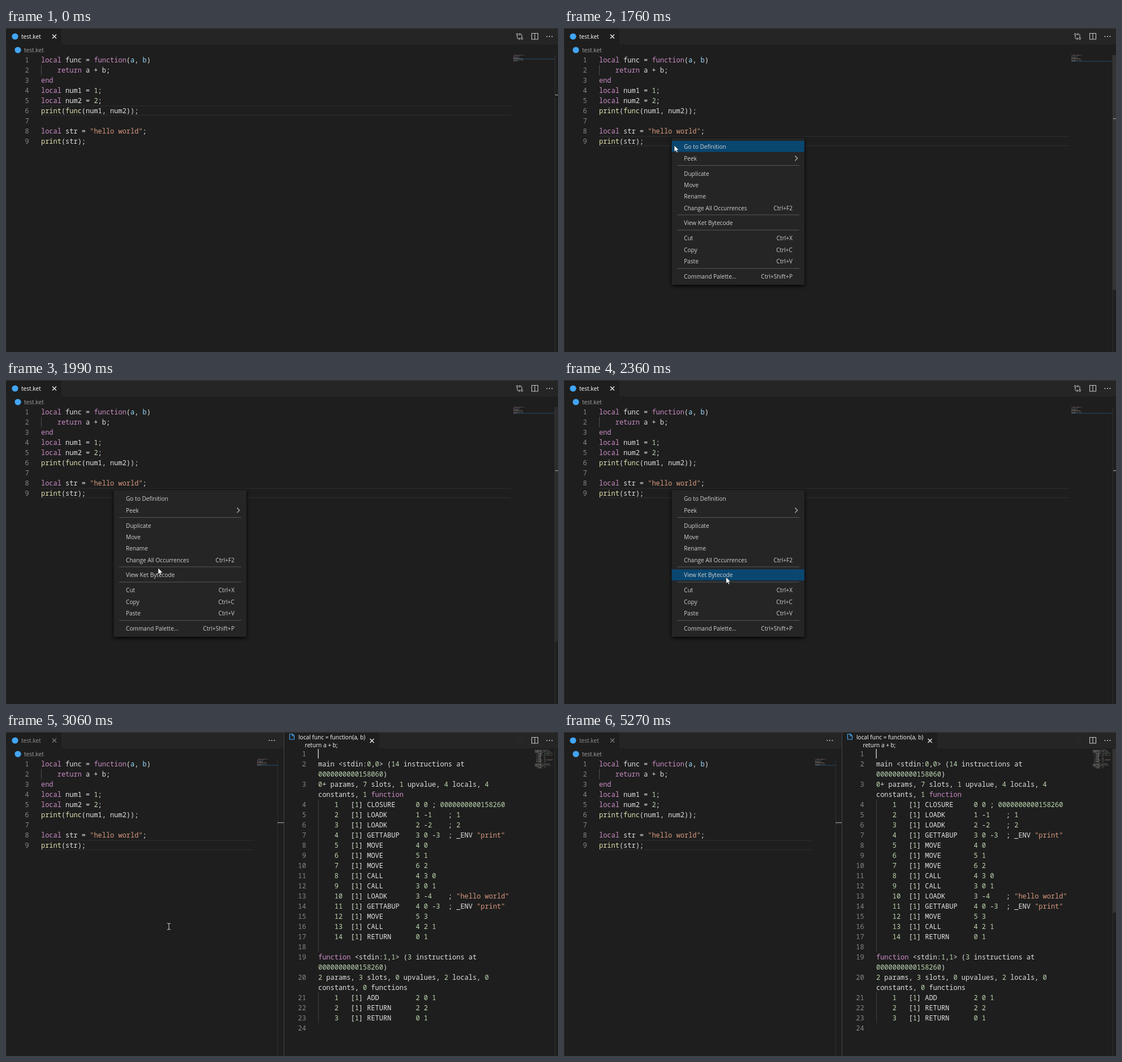
Write an HTML page that moves like this. It is 976 px wide and 574 px high and loops after 5.6 s.

```html
<!DOCTYPE html>
<html lang="en">
<head>
<meta charset="utf-8">
<title>Bytecode viewer</title>
<style>
  html, body { margin: 0; width: 100%; height: 100%; overflow: hidden; background: #1e1e1e; }
  svg { display: block; width: 976px; height: 574px; }
  text { white-space: pre; }
  .code { font: 500 11.97px "Noto Sans Mono", monospace; }
  .ui { font: 10.15px "Open Sans", "Noto Sans", sans-serif; }
</style>
</head>
<body>
<svg id="stage" viewBox="0 0 976 574"></svg>
<script>
const LOOP = 5600;
const LINE = 18;
const stage = document.getElementById('stage');
const COLOR = {
  text: '#e2e2e2', keyword: '#cd8cc7', string: '#d8997f',
  number: '#bdd6b0', param: '#9cdcfe', call: '#e2e2b0'
};

// ---- Drawing helpers ----
function add(parent, tag, attrs = {}, content) {
  const node = document.createElementNS('http://www.w3.org/2000/svg', tag);
  for (const key in attrs) node.setAttribute(key, attrs[key]);
  if (content !== undefined) node.textContent = content;
  parent.appendChild(node);
  return node;
}
const group = (parent = stage) => add(parent, 'g');
const rect = (parent, x, y, width, height, fill) =>
  add(parent, 'rect', { x, y, width, height, fill });
const stroke = (parent, d, color, width = 1) =>
  add(parent, 'path', { d, stroke: color, 'stroke-width': width, fill: 'none' });
const label = (parent, x, y, content, fill, anchor = 'start') =>
  add(parent, 'text', { x, y, fill, class: 'ui', 'text-anchor': anchor }, content);
const show = (node, opacity) => node.setAttribute('opacity', +opacity);

function tokens(line) {
  const pattern = /("[^"]*")|\b(local|function|return|end)\b|\b([ab])(?=[,)])|\b(\w+)(?=\()|\b(\d+)\b/g;
  const kinds = ['string', 'keyword', 'param', 'call', 'number'];
  const result = [];
  let last = 0;
  for (const match of line.matchAll(pattern)) {
    if (match.index > last) result.push([line.slice(last, match.index), 'text']);
    result.push([match[0], kinds[match.slice(1).findIndex(Boolean)]]);
    last = match.index + match[0].length;
  }
  if (last < line.length) result.push([line.slice(last), 'text']);
  return result;
}

function codeBlock(parent, rows, x, numberX, baseline) {
  rows.forEach(([number, line], i) => {
    const y = baseline + i * LINE;
    if (number) {
      add(parent, 'text', { x: numberX, y, fill: '#858585', class: 'code', 'text-anchor': 'end' }, number);
    }
    const row = add(parent, 'text', { x, y, class: 'code' });
    for (const [part, kind] of tokens(line)) add(row, 'tspan', { fill: COLOR[kind] }, part);
  });
}

function minimap(parent, rows, x, y) {
  rows.forEach(([, line], i) => {
    let column = 0;
    for (const [part, kind] of tokens(line)) {
      for (const word of part.matchAll(/\S+/g)) {
        rect(parent, x + (column + word.index) * 0.68, y + i * 1.27,
          word[0].length * 0.68, 0.9, COLOR[kind]).setAttribute('opacity', 0.4);
      }
      column += part.length;
    }
  });
}

const closeIcon = (parent, x, y, color) =>
  stroke(parent, `M${x - 3.5} ${y - 3.5}l7 7m0-7l-7 7`, color, 1.1);

function dots(parent, x) {
  for (const dx of [-4.5, 0, 4.5]) add(parent, 'circle', { cx: x + dx, cy: 15, r: 1.05, fill: '#c5c5c5' });
}

function lineBorder(parent, row, width) {
  const top = 47.5 + row * LINE;
  stroke(parent, `M62 ${top + 0.5}h${width}M62 ${top + 17}h${width}`, '#2a2a2a', 1.6);
}

// ---- Document contents ----
const sourceRows = [
  'local func = function(a, b)',
  '    return a + b;',
  'end',
  'local num1 = 1;',
  'local num2 = 2;',
  'print(func(num1, num2));',
  '',
  'local str = "hello world";',
  'print(str);'
].map((line, i) => [i + 1, line]);

function instructions(list, firstNumber) {
  return list.map((entry, i) => {
    const [op, args, comment] = entry.split('|');
    const padded = comment ? args.padEnd(4 * Math.ceil((args.length + 1) / 4)) + '; ' + comment : args;
    return [firstNumber + i, '    ' + String(i + 1).padEnd(4) + '[1] ' + op.padEnd(12) + padded];
  });
}

const bytecodeRows = [
  [1, ''],
  [2, 'main <stdin:0,0> (14 instructions at'],
  [0, '0000000000158060)'],
  [3, '0+ params, 7 slots, 1 upvalue, 4 locals, 4'],
  [0, 'constants, 1 function'],
  ...instructions([
    'CLOSURE|0 0|0000000000158260', 'LOADK|1 -1|1', 'LOADK|2 -2|2',
    'GETTABUP|3 0 -3|_ENV "print"', 'MOVE|4 0', 'MOVE|5 1', 'MOVE|6 2',
    'CALL|4 3 0', 'CALL|3 0 1', 'LOADK|3 -4|"hello world"',
    'GETTABUP|4 0 -3|_ENV "print"', 'MOVE|5 3', 'CALL|4 2 1', 'RETURN|0 1'
  ], 4),
  [18, ''],
  [19, 'function <stdin:1,1> (3 instructions at'],
  [0, '0000000000158260)'],
  [20, '2 params, 3 slots, 0 upvalues, 2 locals, 0'],
  [0, 'constants, 0 functions'],
  ...instructions(['ADD|2 0 1', 'RETURN|2 2', 'RETURN|0 1'], 21),
  [24, '']
];

// ---- Shared frame ----
rect(stage, 0, 0, 976, 574, '#1e1e1e');
rect(stage, 98, 1, 878, 28, '#252526');
rect(stage, 0, 0, 976, 1, '#383838');
rect(stage, 0, 29, 1, 545, '#292929');
add(stage, 'circle', { cx: 16, cy: 15, r: 5.6, fill: '#42a5f5' });
add(stage, 'circle', { cx: 21, cy: 39, r: 5.6, fill: '#42a5f5' });
const tabTitle = label(stage, 27, 19.3, 'test.ket', '#fff');
const tabClose = closeIcon(stage, 85.5, 15, '#fff');
label(stage, 32, 42.6, 'test.ket', '#a0a0a0');

// ---- Single-editor layout ----
const single = group();
const borderBefore = group(single);
const borderAfter = group(single);
minimap(single, sourceRows, 897, 47.6);
rect(single, 970, 48, 1, 526, '#303030');
const singleSlider = rect(single, 970, 48, 6, 416, '#434343');
const markBefore = rect(single, 971, 118, 5, 1.2, '#a0a0a0');
const markAfter = rect(single, 971, 160, 5, 1.2, '#a0a0a0');
for (const [layer, row] of [[borderBefore, 5], [borderAfter, 8]]) {
  lineBorder(layer, row, 830);
  rect(layer, 897, 48 + row * 1.3, 73, 1, '#264f6c');
}
const compareIcon = group();
stroke(compareIcon,
  'M904 13v4.5q0 1.5 1.5 1.5h3m-1.7-2l2 2l-2 2M912 17v-4.5q0-1.5-1.5-1.5h-3m1.7-2l-2 2l2 2', '#c5c5c5');
for (const [cx, cy] of [[904, 11.3], [912, 18.7]]) {
  add(compareIcon, 'circle', { cx, cy, r: 1.6, fill: '#252526', stroke: '#c5c5c5' });
}

// ---- Split layout ----
const split = group();
rect(split, 480, 48, 1, 526, '#303030');
lineBorder(split, 8, 377);
rect(split, 444, 58.4, 36, 1, '#264f6c');
minimap(split, sourceRows, 444, 47.6);
const leftSlider = rect(split, 480, 48, 11, 416, '#434343');
rect(split, 480, 160, 11, 1.2, '#a0a0a0');
dots(split, 470);
rect(split, 491, 1, 1, 573, '#444');
rect(split, 492, 1, 168, 28, '#1e1e1e');
stroke(split, 'M501.5 3.5h5l3 3v6.5h-8zM506 3.5v3.5h3.5', '#42a5f5', 1.2);
label(split, 517, 13.2, 'local func = function(a, b)', '#fff');
label(split, 528.5, 27.3, 'return a + b;', '#fff');
closeIcon(split, 647, 15.5, '#fff');

const bytecode = group(split);
stroke(bytecode, 'M552.5 119.5V389M552.5 461.5V515.5', '#404040');
codeBlock(bytecode, bytecodeRows, 552, 530.6, 42.8);
minimap(bytecode, bytecodeRows, 935, 30.5);
rect(bytecode, 970, 30, 1, 544, '#303030');
rect(bytecode, 551.5, 30, 1.3, 17, '#d8d8d8');
const rightSlider = rect(bytecode, 970, 30, 6, 290, '#434343');

// ---- Left code and remaining toolbar ----
stroke(stage, 'M62.5 65.5v18', '#505050');
codeBlock(stage, sourceRows, 62, 40.8, 60.8);
const caret = rect(stage, 141.3, 192, 1.3, 17, '#d8d8d8');
stroke(stage, 'M929.5 9.5h11v10.5h-11zM935 9.5v10.5', '#c5c5c5', 1.1);
dots(stage, 961);

// ---- Context menu ----
const menu = group();
const panel = rect(menu, 190.5, 195, 234.5, 260, '#252526');
panel.style.filter = 'drop-shadow(0 2px 3px #000)';
const hover = rect(menu, 190.5, 0, 234.5, 19.6, '#094771');
const menuItems = [
  [210, 'Go to Definition'], [231, 'Peek'], [258, 'Duplicate'], [278, 'Move'],
  [298.5, 'Rename'], [319, 'Change All Occurrences', 'Ctrl+F2'],
  [345.5, 'View Ket Bytecode'], [372, 'Cut', 'Ctrl+X'], [393, 'Copy', 'Ctrl+C'],
  [413.5, 'Paste', 'Ctrl+V'], [440, 'Command Palette...', 'Ctrl+Shift+P']
];
for (const [y, name, keys] of menuItems) {
  label(menu, 212, y + 3.7, name, '#d0d0d0');
  if (keys) label(menu, 404, y + 3.7, keys, '#d0d0d0', 'end');
}
for (const y of [243.5, 331, 358, 426]) stroke(menu, `M200 ${y}h216`, '#565657');
stroke(menu, 'M408.5 226.5l4.3 4.3l-4.3 4.3', '#ccc', 1.1);

// ---- Pointer ----
const pointer = group();
const ring = group(pointer);
add(ring, 'circle', { r: 10, fill: 'none', stroke: '#000' });
add(ring, 'circle', { r: 9, fill: 'none', stroke: '#fff' });
const beam = stroke(pointer, 'M-3-5.5h2l1 1l1-1h2M0-4.5v9M-3 5.5h2l1-1l1 1h2', '#d8d8d8');
const arrow = add(pointer, 'path', {
  d: 'M0 0V11.3L2.6 8.9L4.4 12.8L6.2 12L4.5 8.2H8.1Z',
  fill: '#fff', stroke: '#111', 'stroke-width': 0.6
});

const path = [
  [190, 480, 553], [610, 192.5, 194.5], [1340, 192.5, 194.5], [1390, 191, 194],
  [1715, 191, 194], [1760, 195, 208], [1990, 269, 333], [2170, 286, 356],
  [2270, 286, 356], [2440, 287, 344], [2870, 287.5, 344], [2910, 288, 344.5],
  [3890, 288, 344.5], [4420, 837, 522.5], [4460, 848, 526], [4890, 922, 582]
];

function pointerAt(t) {
  const next = path.findIndex(key => key[0] > t);
  if (next === 0) return path[0].slice(1);
  if (next < 0) return path[path.length - 1].slice(1);
  const [t0, x0, y0] = path[next - 1];
  const [t1, x1, y1] = path[next];
  const u = (t - t0) / (t1 - t0);
  const eased = u * u * (3 - 2 * u);
  return [x0 + (x1 - x0) * eased, y0 + (y1 - y0) * eased];
}

const within = (t, from, to) => t >= from && t < to;
const ramp = (t, from, to) => Math.min(1, Math.max(0, (t - from) / (to - from)));

function render(t) {
  const isSplit = t >= 2960;
  const clicked = t >= 830;
  const menuOpen = within(t, 1390, 2870);
  const [x, y] = pointerAt(t);

  show(single, !isSplit);
  for (const node of [borderBefore, markBefore]) show(node, !clicked);
  for (const node of [borderAfter, markAfter]) show(node, clicked);
  show(caret, within(t, 830, 1190) || within(t, 2870, 2960));
  show(compareIcon, isSplit ? 0.04 : 1);

  // Scrollbars fade out after the pointer leaves their editor.
  show(singleSlider, ramp(t, 190, 290) * (1 - ramp(t, 1390, 2300)));
  show(leftSlider, ramp(t, 3930, 4000) * (1 - ramp(t, 4150, 4600)));
  show(rightSlider, t < 4100 ? 0 : t < 5270 ? 1 : 0.6);

  show(split, isSplit);
  show(bytecode, t >= 3010);
  tabTitle.setAttribute('fill', isSplit ? '#909090' : '#fff');
  tabClose.setAttribute('stroke', isSplit ? '#808080' : '#fff');

  const item = menuItems.find(([center]) => Math.abs(y - center) <= 10);
  show(menu, menuOpen);
  show(hover, Boolean(item));
  if (item) hover.setAttribute('y', item[0] - 10);

  pointer.setAttribute('transform', `translate(${x} ${y})`);
  show(pointer, within(t, 190, 4890));
  show(beam, !menuOpen);
  show(arrow, menuOpen);
  show(ring, within(t, 780, 880) || within(t, 1190, 1390) || within(t, 2720, 2870));
}

const start = performance.now();
function tick() {
  render((performance.now() - start) % LOOP);
  requestAnimationFrame(tick);
}
tick();
</script>
</body>
</html>
```
